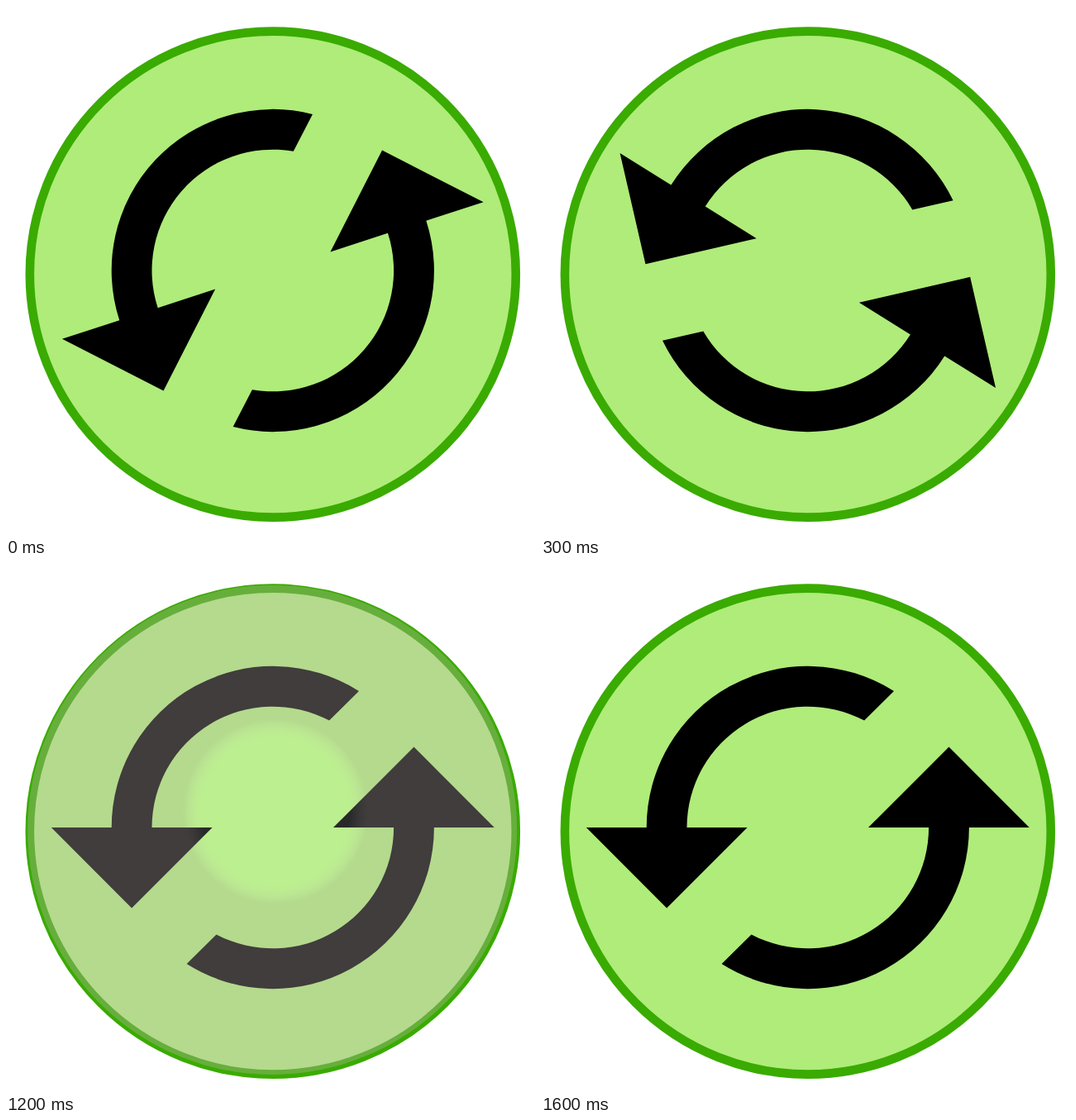
Recreate the animation shown at these times as an HTML page. Size 640 px wide and 640 px high, loop 3.6 s.

```html
<!DOCTYPE html>
<html lang="en">
<head>
<meta charset="utf-8">
<title>Refresh button</title>
<style>
  html, body { margin: 0; width: 100%; height: 100%; overflow: hidden; background: #fff; }
  svg { display: block; width: 100%; height: 100%; }
</style>
</head>
<body>
<svg viewBox="0 0 640 640">
  <defs>
    <radialGradient id="glow" gradientUnits="userSpaceOnUse" cx="326" cy="300.5" r="112">
      <stop offset=".8" stop-color="#fff" stop-opacity=".16"/>
      <stop offset="1" stop-color="#bfb6b3" stop-opacity=".335"/>
    </radialGradient>
    <path id="arrow" d="M104.2-165A195.1 195.1 0 0 0-195.1 0H-268L-170.7 97.4-73.2 0H-146.3A146.3 146.3 0 0 1 68.3-129.4Z"/>
  </defs>
  <circle cx="322.8" cy="324.6" r="294" fill="#afec7a" stroke="#3aab00" stroke-width="10.6"/>
  <g id="arrows">
    <use href="#arrow"/>
    <use href="#arrow" transform="rotate(180)"/>
  </g>
  <circle id="shine" cx="322.2" cy="322.9" r="296" fill="url(#glow)"/>
</svg>
<script>
  const LOOP = 3600, STEP = 100, SHINE_START = 12;
  const angles = [18, 54, 108, 148, 172, 178, 180];
  const shineOpacity = [1, 1, 1, 0.5];
  const [arrows, shine, glow] = ['arrows', 'shine', 'glow'].map(id => document.getElementById(id));

  function draw(now) {
    const step = Math.floor(now % LOOP / STEP);
    const angle = angles[Math.min(step, angles.length - 1)];
    arrows.setAttribute('transform', `translate(322.8 320) rotate(${-angle})`);

    const shineStep = step - SHINE_START;
    const opacity = shineOpacity[shineStep] || 0;
    shine.setAttribute('opacity', opacity);
    if (opacity) glow.setAttribute('r', 112 + 158 * shineStep);
  }

  const start = performance.now();
  function tick() {
    draw(performance.now() - start);
    requestAnimationFrame(tick);
  }
  tick();
</script>
</body>
</html>
```
